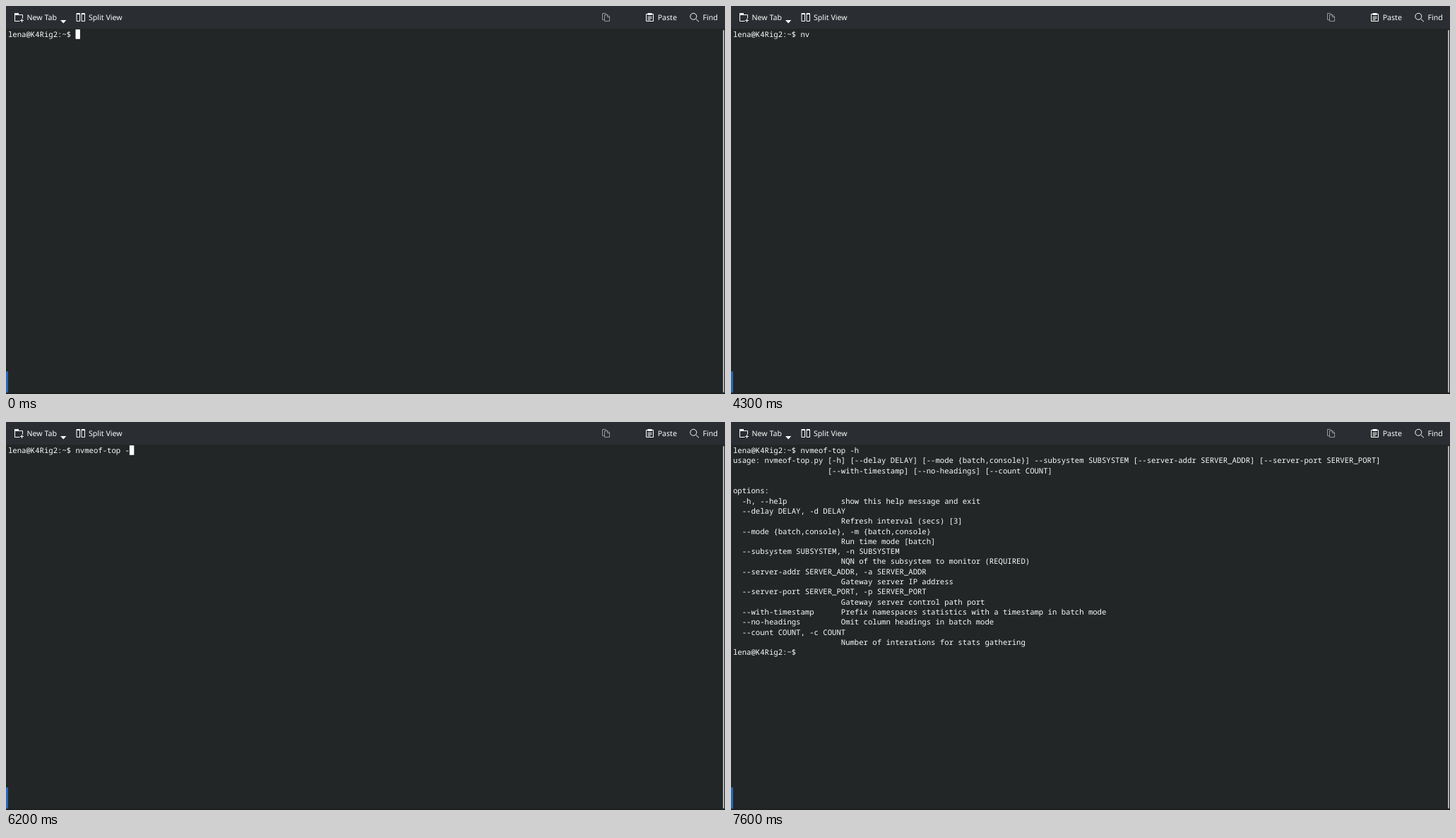
Write an HTML page that moves like this. It is 1018 by 550 pixels and loops after 8 s.

```html
<!DOCTYPE html>
<html lang="en">
<head>
<meta charset="utf-8">
<title>Terminal session</title>
<style>
  html, body { margin: 0; width: 100%; height: 100%; overflow: hidden; background: #232627; }
  svg { display: block; }
  text { white-space: pre; fill: #fcfcfc; text-rendering: geometricPrecision; }
  #toolbar text { font: 10.6px "Noto Sans", sans-serif; }
  #screen text { font: 10.61px "Noto Sans Mono", monospace; font-variant-ligatures: none; }
  .line { fill: none; stroke: #fcfcfc; }
  .solid { fill: #fcfcfc; }
</style>
</head>
<body>
<svg width="1018" height="550" viewBox="0 0 1018 550">
  <rect width="1018" height="550" fill="#232627"/>
  <rect width="1018" height="32" fill="#2a2e32"/>
  <g id="toolbar">
    <path class="line" d="M12.5 10V21.5H19.5M18 12.5H23.5V17.5M20 20.5H25M22.5 18V23"/>
    <path class="solid" d="M12 10H18V13H12Z"/>
    <text x="29.5" y="20">New Tab</text>
    <path class="solid" d="M77 20H85.4L81.2 24.4Z"/>
    <path class="line" d="M100 10.5H104.5V21.5H100ZM107 10.5H111.5V21.5H107ZM100 11.5H104.5M107 11.5H111.5"/>
    <text x="117" y="20">Split View</text>
    <path class="line" style="stroke:#a0a3a5" stroke-width=".9" d="M847 19.5H844.5V10.5H849L851 12.5M847.5 12.5H852L854.5 15V21.5H847.5ZM851.5 12.5V15.5H854.5"/>
    <path class="line" d="M909 11.5H906.5V21.5H916.5V11.5H914M908.5 15.5H914.5M908.5 17.5H914.5M908.5 19.5H912.5"/>
    <path class="solid" d="M908.5 10H914.5V13H908.5Z"/>
    <text x="922.7" y="20">Paste</text>
    <path class="line" d="M976.6 18.2L981 22.3"/>
    <circle class="line" cx="973.3" cy="14.8" r="4.5"/>
    <text x="986.5" y="20">Find</text>
  </g>
  <g id="screen"></g>
  <rect id="cursor" width="6.4" height="13.6" fill="#fcfcfc"/>
  <rect y="518" width="3" height="30" fill="#2867b2"/>
  <rect y="548" width="1018" height="2" fill="#1e2023"/>
  <rect x="1015" y="34" width="2" height="514" rx="1" fill="#b0b2b3"/>
</svg>
<script>
const LOOP = 8000, BLINK = 500;
const LEFT = 3, TOP = 33.2, CELL = 6.366, ROW = 14.3, BASELINE = 10.9;
const PROMPT = 'lena@K4Rig2:~$ ';
const COMMAND = 'nvmeof-top -h';
const keyTimes = [3700, 3800, 4700, 4800, 5000, 5100, 5400, 5700, 5800, 6000, 6100, 6200, 7100];
const ENTER = 7200, OUTPUT = 7300, DONE = 7400;

const help = `usage: nvmeof-top.py [-h] [--delay DELAY] [--mode {batch,console}] --subsystem SUBSYSTEM [--server-addr SERVER_ADDR] [--server-port SERVER_PORT]
                     [--with-timestamp] [--no-headings] [--count COUNT]

options:
  -h, --help            show this help message and exit
  --delay DELAY, -d DELAY
                        Refresh interval (secs) [3]
  --mode {batch,console}, -m {batch,console}
                        Run time mode [batch]
  --subsystem SUBSYSTEM, -n SUBSYSTEM
                        NQN of the subsystem to monitor (REQUIRED)
  --server-addr SERVER_ADDR, -a SERVER_ADDR
                        Gateway server IP address
  --server-port SERVER_PORT, -p SERVER_PORT
                        Gateway server control path port
  --with-timestamp      Prefix namespaces statistics with a timestamp in batch mode
  --no-headings         Omit column headings in batch mode
  --count COUNT, -c COUNT
                        Number of interations for stats gathering`.split('\n');

const screenGroup = document.getElementById('screen');
const cursor = document.getElementById('cursor');

const rows = Array.from({ length: help.length + 2 }, (_, i) => {
  const row = document.createElementNS('http://www.w3.org/2000/svg', 'text');
  row.setAttribute('x', LEFT);
  row.setAttribute('y', TOP + i * ROW + BASELINE);
  return screenGroup.appendChild(row);
});

function linesAt(t, typed) {
  const lines = [PROMPT + COMMAND.slice(0, typed)];
  if (t >= OUTPUT) lines.push(...help);
  if (t >= ENTER) lines.push(t >= DONE ? PROMPT : '');
  return lines;
}

function render(t) {
  const typed = keyTimes.filter(k => k <= t).length;
  const lines = linesAt(t, typed);
  rows.forEach((row, i) => {
    const line = lines[i] || '';
    if (row.textContent !== line) row.textContent = line;
  });

  // Each keystroke restarts the blink cycle.
  const lastKey = typed ? keyTimes[typed - 1] : 0;
  const lit = Math.floor((t - lastKey) / BLINK) % 2 === 0;
  const last = lines.length - 1;
  cursor.setAttribute('x', LEFT + lines[last].length * CELL);
  cursor.setAttribute('y', TOP + last * ROW);
  cursor.setAttribute('visibility', lit ? 'visible' : 'hidden');
}

function tick() {
  render(performance.now() % LOOP);
  requestAnimationFrame(tick);
}
tick();
</script>
</body>
</html>
```
